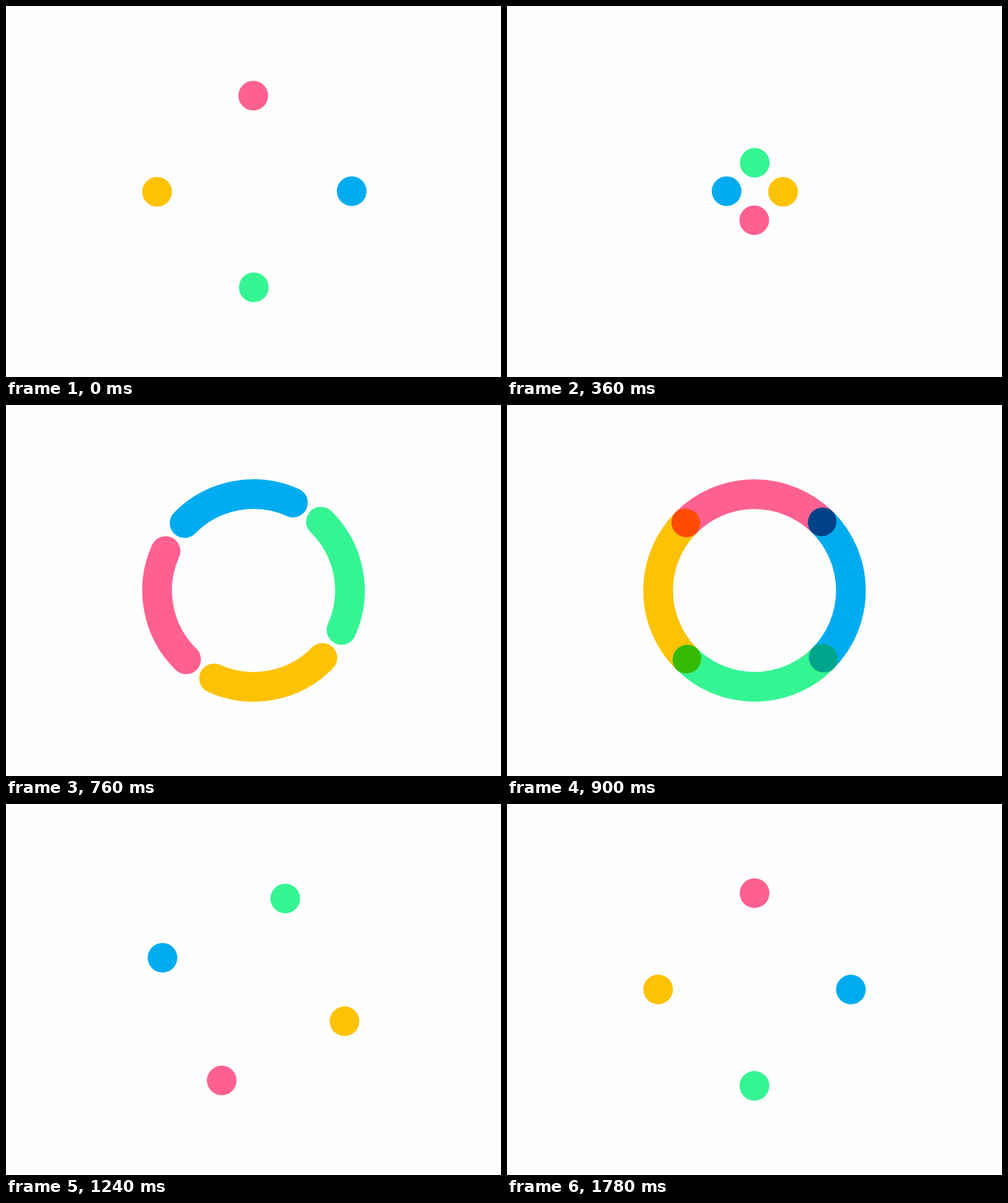
Recreate the animation shown at these times as an HTML page with a canvas. Size 800 by 600 pixels, loop 1800 ms.

```html
<!DOCTYPE html>
<html lang="en">
<head>
<meta charset="utf-8">
<title>Four dot loader</title>
<style>
  html, body { margin: 0; width: 100%; height: 100%; overflow: hidden; background: #fefefe; }
  canvas { display: block; }
</style>
</head>
<body>
<canvas id="stage" width="800" height="600"></canvas>
<script>
const ctx = document.getElementById('stage').getContext('2d');
const LOOP = 1800, PHASE = 600, TICK = 20;
const CX = 400, CY = 300, RADIUS = 155.8, DOT = 48;
const SLIVER = 0.36; // shortest arc in degrees, reads as a dot

// home: angle in degrees (clockwise from the right) after the crossing
const dots = [
  { color: '#ffc305', home: 0,   from: [244.2, 300.5], to: [555.8, 300.5] },
  { color: '#ff6192', home: 90,  from: [399.6, 145],   to: [399.6, 455.8] },
  { color: '#00adf0', home: 180, from: [558.7, 299.5], to: [244.2, 299.5] },
  { color: '#35f694', home: 270, from: [400.4, 455],   to: [400.4, 144.2] }
];

const rad = deg => deg * Math.PI / 180;
const mix = (a, b, k) => a + (b - a) * k;
const smooth = u => u * u * (3 - 2 * u);

function bezier(x1, y1, x2, y2) {
  const at = (a, b, s) => 3 * a * s * (1 - s) ** 2 + 3 * b * s * s * (1 - s) + s ** 3;
  return x => {
    let lo = 0, hi = 1;
    for (let i = 0; i < 30; i++) {
      const mid = (lo + hi) / 2;
      if (at(x1, x2, mid) < x) lo = mid; else hi = mid;
    }
    return at(y1, y2, lo);
  };
}
const settle = bezier(0.333, 0.517, 0.52, 1);

function drawDot(x, y, color) {
  ctx.fillStyle = color;
  ctx.beginPath();
  ctx.arc(x, y, DOT / 2, 0, Math.PI * 2);
  ctx.fill();
}

function drawArc(tail, length, color) {
  ctx.strokeStyle = color;
  ctx.beginPath();
  ctx.arc(CX, CY, RADIUS, rad(tail), rad(tail + length));
  ctx.stroke();
}

const phases = [
  // cross through the centre
  (d, u) => {
    const k = smooth(u);
    drawDot(mix(d.from[0], d.to[0], k), mix(d.from[1], d.to[1], k), d.color);
  },
  // stretch into an arc, one full turn
  (d, u) => {
    const tail = 360 * u * u * (2 - u);
    drawArc(d.home + tail, SLIVER + 355 * u * (1 - u), d.color);
  },
  // half a turn back to the start
  (d, u) => {
    const a = rad(d.home + SLIVER / 2 + 180 * settle(u));
    drawDot(CX + RADIUS * Math.cos(a), CY + RADIUS * Math.sin(a), d.color);
  }
];

function render(ms) {
  const t = Math.floor((ms % LOOP) / TICK + 0.001) * TICK % LOOP;
  const phase = Math.floor(t / PHASE);
  const u = (t - phase * PHASE) / PHASE;
  ctx.globalCompositeOperation = 'source-over';
  ctx.fillStyle = '#fefefe';
  ctx.fillRect(0, 0, 800, 600);
  ctx.globalCompositeOperation = 'multiply';
  ctx.lineWidth = DOT;
  ctx.lineCap = 'round';
  dots.forEach(d => phases[phase](d, u));
}

const start = performance.now();
function frame() {
  render(Math.max(0, performance.now() - start));
  requestAnimationFrame(frame);
}
frame();
</script>
</body>
</html>
```
